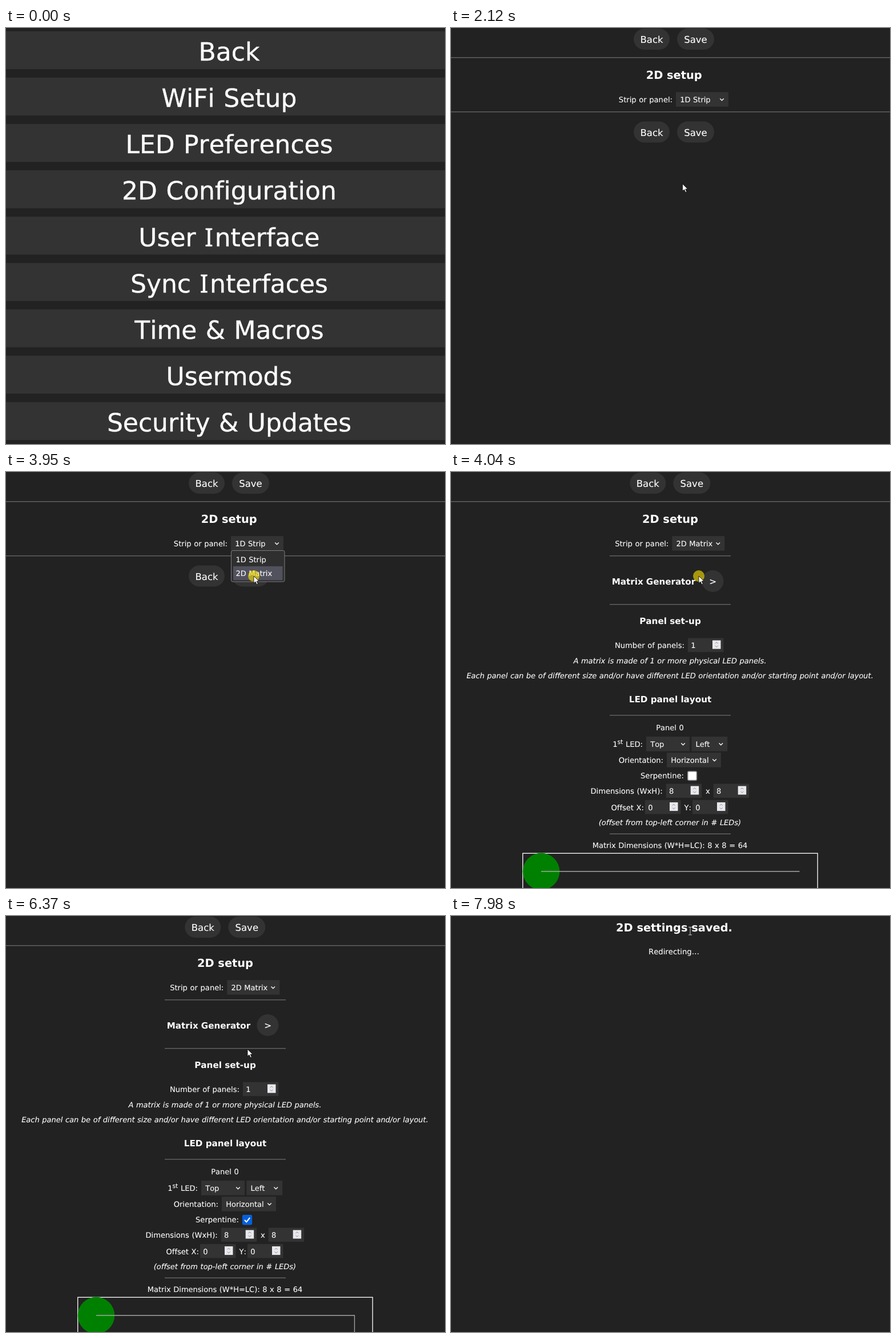
Write an HTML page that moves like this. It is 769x728 px and loops after 8 s.

```html
<!DOCTYPE html>
<html lang="en">
<head>
<meta charset="utf-8">
<title>2D setup walkthrough</title>
<style>
  html, body { margin: 0; width: 100%; height: 100%; overflow: hidden; background: #222; }
  svg { display: block; width: 769px; height: 728px; }
  text {
    font-family: "DejaVu Sans", Verdana, sans-serif;
    font-kerning: none;
    font-variant-ligatures: none;
    text-rendering: geometricPrecision;
    word-spacing: .034em;
    white-space: pre;
    fill: #fff;
    stroke: #fff;
    stroke-width: .008em;
  }
  .mid { text-anchor: middle; }
  .end { text-anchor: end; }
  .bold { font-weight: bold; word-spacing: 0; stroke: none; }
  .italic { font-style: italic; }
  .serif-i { font-family: "Noto Sans", sans-serif; letter-spacing: .06em; }
</style>
</head>
<body>
<svg id="stage" viewBox="0 0 769 728"></svg>
<script>
const DURATION = 8000;
const STEP = 101;
const FIELD = '#333';

// Drawing helpers
const text = (x, y, str, size = 13, cls = '') =>
  `<text x="${x}" y="${y}" font-size="${size}" class="${cls}">${str}</text>`;
const rect = (x, y, w, h, fill, extra = '') =>
  `<rect x="${x}" y="${y}" width="${w}" height="${h}" fill="${fill}" ${extra}/>`;
const circle = (x, y, r, fill, extra = '') =>
  `<circle cx="${x}" cy="${y}" r="${r}" fill="${fill}" ${extra}/>`;
const line = (d, stroke, width = 1) =>
  `<path d="${d}" fill="none" stroke="${stroke}" stroke-width="${width}"/>`;
const group = (id, ...parts) => `<g id="${id}" display="none">${parts.join('')}</g>`;

// Page elements; fields and labels are placed by their text baseline
const rule = (y, x = 0, w = 769) => rect(x, y - .6, w, 1.3, '#6a6a6a');
const shortRule = y => rule(y, 278, 212);
const heading = (y, str, size = 15.2, x = 384) => text(x, y, str, size, 'mid bold');
const note = (y, str, cls = 'italic') => text(383.5, y, str, 13, 'mid ' + cls);
const label = (x, base, str) => text(x - 6, base, str, 13.1, 'end');
const pill = (x, y, w, str) =>
  rect(x, y, w, 37, FIELD, 'rx="18.5"') + text(x + w / 2, y + 25, str, 16.5, 'mid');
const buttons = (x, y) => pill(x, y, 63, 'Back') + pill(x + 76, y, 65, 'Save');
const select = (x, base, w, str) =>
  rect(x, base - 17.8, w, 25.5, FIELD) + text(x + 7.2, base, str) +
  line(`M${x + w - 14.8} ${base - 6.5}l3.3 3.3l3.3 -3.3`, '#fff', 1.3);
const number = (x, base, value) =>
  rect(x, base - 17.4, 62.5, 24.5, FIELD) + text(x + 5.3, base, value) +
  rect(x + 43, base - 13.4, 14.5, 15, '#e9e9ed') +
  line(`M${x + 47.7} ${base - 7.8}l2.5 -2.3l2.5 2.3m-5 3.8l2.5 2.3l2.5 -2.3`, '#8a8a92');
const header = (center, choice) =>
  buttons(center - 70.7, 1) + rule(51.7) + heading(89, '2D setup', 19.4, center) +
  label(center + 3.3, 130, 'Strip or panel:') + select(center + 3.3, 130, 92, choice);

const menuItems = ['Back', 'WiFi Setup', 'LED Preferences', '2D Configuration', 'User Interface',
  'Sync Interfaces', 'Time &amp; Macros', 'Usermods', 'Security &amp; Updates'];

const menuPage = group('menu', ...menuItems.map((item, i) => {
  const y = 5.6 + i * 81.13;
  const str = item.replace('I', '<tspan class="serif-i">I</tspan>');
  return rect(0, y, 769, 66.4, FIELD) + text(391, y + 51.4, str, 44, 'mid');
}));

const stripPage = group('strip', header(390.7, '1D Strip'), rule(146.7), buttons(320, 163.5));

const popup = group('popup',
  rect(394.5, 137.5, 93.5, 54.5, '#2f2f2f', 'rx="2.5" stroke="#7c7c80"'),
  '<rect id="option" x="398" width="86.5" height="24.3" fill="#52525e"/>',
  text(402.4, 158, '1D Strip'), text(402.4, 182, '2D Matrix'));

const matrixPage = group('matrix',
  header(384, '2D Matrix'),
  ...[146.7, 231.7, 425.7, 633.3].map(shortRule),
  heading(197, 'Matrix Generator', 15.1, 355),
  circle(458.5, 191, 19, FIELD), text(458.7, 197, '&gt;', 15.5, 'mid'),
  heading(266, 'Panel set-up'),
  label(415, 308, 'Number of panels:'), number(415, 308, 1),
  note(335, 'A matrix is made of 1 or more physical LED panels.'),
  note(361, 'Each panel can be of different size and/or have different LED orientation ' +
    'and/or starting point and/or layout.'),
  heading(402.5, 'LED panel layout'),
  note(452, 'Panel 0', ''),
  label(342, 481, '1<tspan dy="-5.5" font-size="10.8">st</tspan><tspan dy="5.5"> LED:</tspan>'),
  select(342, 481, 76, 'Top'), select(421.3, 481, 63, 'Left'),
  label(378, 509, 'Orientation:'), select(378, 509, 95, 'Horizontal'),
  label(414, 536, 'Serpentine:'),
  rect(414.8, 524, 15.5, 15.5, '#fff', 'rx="2" stroke="#8f8f9d" stroke-width="1.6"'),
  label(376.7, 563, 'Dimensions (WxH):'), number(376.7, 563, 8),
  label(459.7, 563, 'x'), number(459.7, 563, 8),
  label(344, 591.5, 'Offset X:'), number(340, 591.5, 0),
  label(427, 591.5, 'Y:'), number(423, 591.5, 0),
  note(618, '(offset from top-left corner in # LEDs)'),
  note(658, 'Matrix Dimensions (W*H=LC): 8 x 8 = 64', ''),
  rect(125.7, 667.3, 516.5, 80, 'none', 'stroke="#fff" stroke-width="1.3"'),
  circle(158, 699, 32.3, '#008000'),
  line('M158 699H610.5', '#a6a6a6', 1.3));

const serpentine = group('serpentine',
  rect(414, 523.2, 17, 17, '#0060df', 'rx="2.5"'),
  line('M418 532l3.2 3.4l6 -7.4', '#fff', 2),
  line('M610.5 698.4V728', '#a6a6a6', 1.3));

const savedPage = group('saved',
  heading(27, '2D settings saved.', 19.4, 391),
  text(390.5, 67, 'Redirecting…', 13.2, 'mid'));

const pointer = group('pointer',
  circle(0, 0, 10, '#ffe600', 'id="click" opacity=".6"'),
  '<path id="arrow" d="M0 0V12.6L3 9.9L5.2 14.8L7.3 13.9L5.2 9.1H9.2Z" ' +
    'fill="#fff" stroke="#000" stroke-width=".8" stroke-linejoin="round"/>',
  '<g id="beam">' + line('M-3 -6.5H3M0 -6.5V7M-3 7H3', '#c8c8c8') + '</g>');

document.getElementById('stage').innerHTML =
  menuPage + stripPage + popup + matrixPage + serpentine + savedPage + pointer;

const el = id => document.getElementById(id);
const show = (id, on) => el(id).setAttribute('display', on ? 'inline' : 'none');

// Each glide eases from the last place to a new one in a few visible steps.
const entry = { x: 503, y: -12 };
const glides = [
  { start: 400, steps: 8, x: 402, y: 291 },
  { start: 2120, steps: 5, x: 436, y: 116 },
  { start: 2940, steps: 1, x: 437, y: 134 },
  { start: 3040, steps: 1, x: 434, y: 202 },
  { start: 3330, steps: 4, x: 434, y: 182 },
  { start: 4630, steps: 3, x: 434, y: 83 },
  { start: 5140, steps: 1, x: 390, y: 450 },
  { start: 5243, steps: 6, x: 425, y: 526 },
  { start: 6070, steps: 4, x: 423, y: 233 },
  { start: 6470, steps: 3, x: 424, y: 110 },
  { start: 6770, steps: 5, x: 425, y: 21 },
  { start: 7980, steps: 1, x: 419, y: 26 },
];
const clickTimes = [1430, 2610, 3950, 5860, 7380];
const beamTimes = [5140, 7980];
const recent = (t, times) => times.some(start => t >= start && t < start + STEP);
const ease = p => p * p * (3 - 2 * p);

function pointerAt(t) {
  const i = glides.findLastIndex(g => t >= g.start);
  if (i < 0) return null;
  const to = glides[i], from = glides[i - 1] || entry;
  const done = Math.min(to.steps, Math.floor((t - to.start) / 100) + 1);
  const p = ease(done / to.steps);
  return [from.x + (to.x - from.x) * p, from.y + (to.y - from.y) * p];
}

function render(t) {
  show('menu', t < 1630);
  show('strip', t >= 1630 && t < 4040);
  show('popup', t >= 2710 && t < 4040);
  el('option').setAttribute('y', t < 3040 ? 140.7 : 165);
  show('matrix', t >= 4040 && t < 7490);
  show('serpentine', t >= 5960 && t < 7490);
  show('saved', t >= 7490);

  const at = pointerAt(t);
  show('pointer', at);
  if (!at) return;
  const beam = recent(t, beamTimes);
  el('pointer').setAttribute('transform', `translate(${at})`);
  show('click', recent(t, clickTimes) && t < 7490);
  show('beam', beam);
  show('arrow', !beam);
}

const begin = performance.now();
function tick() {
  render((performance.now() - begin) % DURATION);
  requestAnimationFrame(tick);
}
tick();
</script>
</body>
</html>
```
